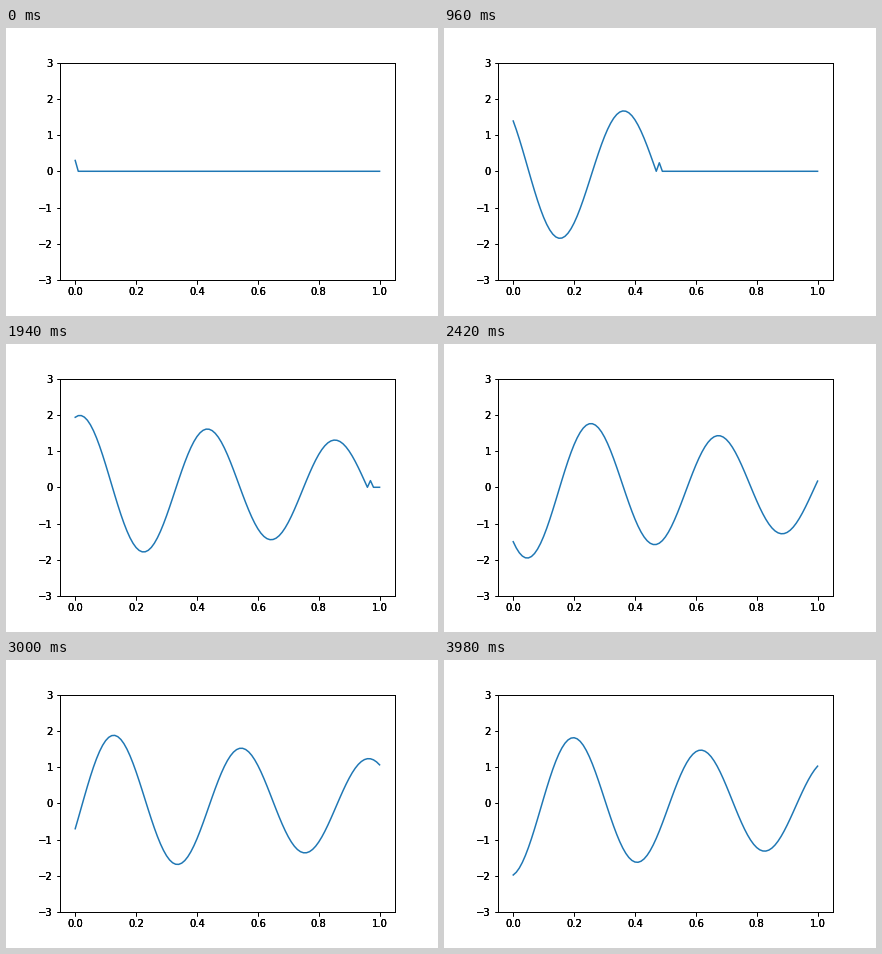
Recreate the animation shown at these times as a matplotlib script. Size 432 by 288 pixels, loop 4000 ms.

```python
import numpy as np
import matplotlib.pyplot as plt
from matplotlib.animation import FuncAnimation

FRAMES, INTERVAL = 200, 20
CELLS = 100
AMPLITUDE, OMEGA, DAMPING = 2, 0.15, 0.995

cells = np.arange(CELLS + 1)
x = cells / CELLS


def wave(step):
    """Damped sine entering at the left and moving one cell per step."""
    emitted = step - cells
    u = AMPLITUDE * np.sin(OMEGA * np.abs(emitted - 1)) * DAMPING**cells
    return np.where(emitted >= 0, u, 0)


def add_axes():
    ax = fig.add_axes([0.125, 0.125, 0.775, 0.755])
    ax.set(xlim=(-0.05, 1.05), ylim=(-3, 3))
    ax.set_xticks(np.linspace(0, 1, 6))
    ax.set_yticks(range(-3, 4))
    return ax


fig = plt.figure(figsize=(6, 4), dpi=72, facecolor="white")
ax = add_axes()
line, = ax.plot(x, wave(0), color="C0", lw=1.5)

# Overlaid frames give the heavy, dark labels and ticks.
for _ in range(2):
    add_axes().patch.set_visible(False)


def update(step):
    line.set_ydata(wave(step))
    return line,


anim = FuncAnimation(fig, update, frames=FRAMES, interval=INTERVAL,
                     repeat=True, repeat_delay=0)
plt.show()
```
